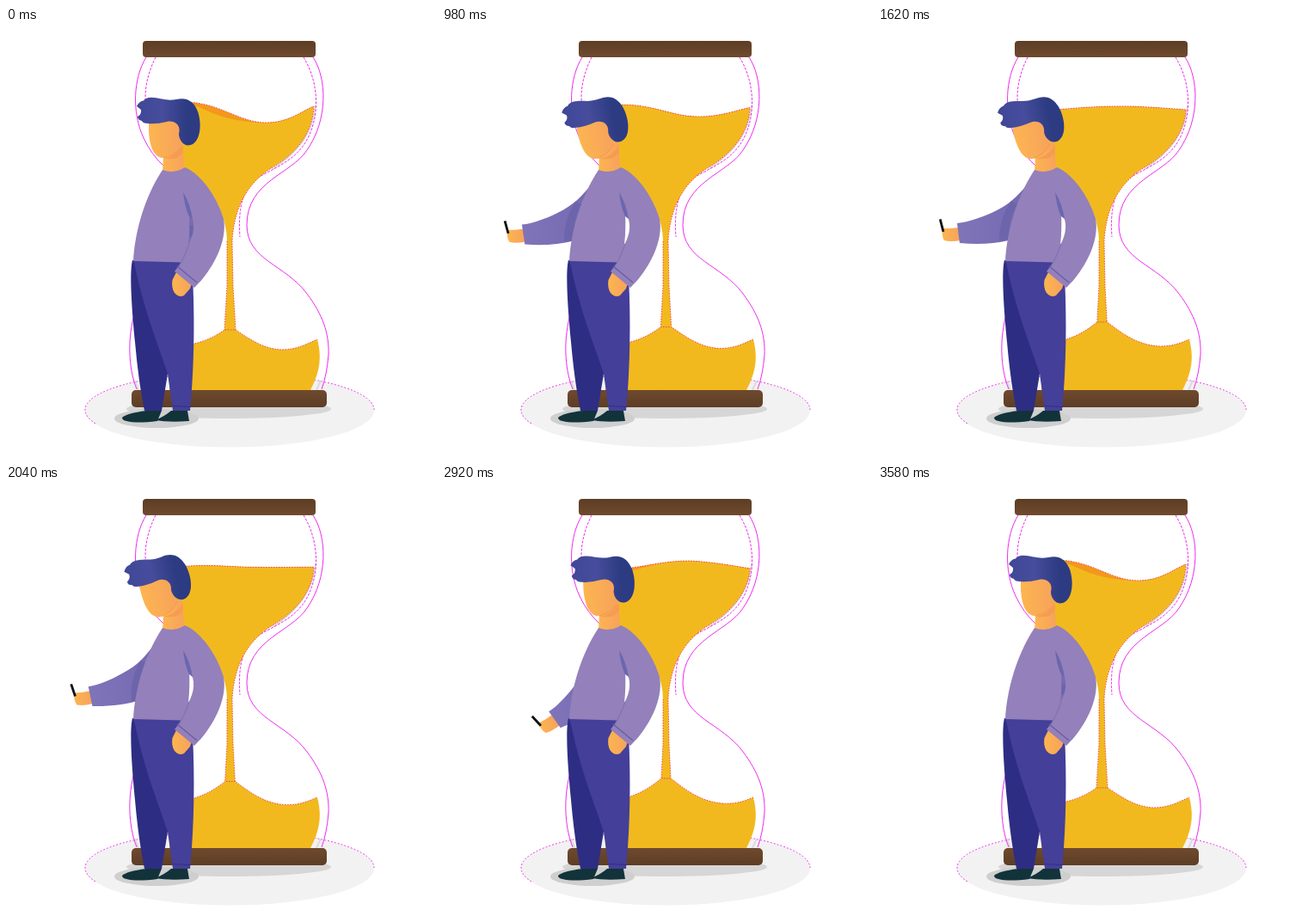
An HTML page that plays this animation: 500 by 500 pixels, repeating every 3600 ms.

```html
<!DOCTYPE html>
<html lang="en">
<head>
<meta charset="utf-8">
<title>Waiting by the hourglass</title>
<style>
  html, body { margin: 0; width: 100%; height: 100%; overflow: hidden; background: #fff; }
  svg { display: block; width: 500px; height: 500px; }
  .glass { fill: none; stroke: #ee2bee; stroke-width: 1; }
  .shine { fill: none; stroke: #dcdcdc; stroke-width: 2; }
  .sand { fill: #f2b91f; }
  .rim { fill: none; stroke: #f0384a; stroke-width: .9; stroke-dasharray: 1.5 1.5; }
</style>
</head>
<body>
<svg viewBox="0 0 500 500">
  <defs>
    <linearGradient id="wood" x2="0" y2="1">
      <stop stop-color="#5d3d25"/><stop offset="1" stop-color="#6f4a2e"/>
    </linearGradient>
    <linearGradient id="hair">
      <stop stop-color="#3f4796"/><stop offset=".4" stop-color="#474d9c"/><stop offset=".8" stop-color="#2c3b82"/>
    </linearGradient>
    <linearGradient id="skin">
      <stop stop-color="#fdb550"/><stop offset="1" stop-color="#f6a25c"/>
    </linearGradient>
    <linearGradient id="sleeve">
      <stop stop-color="#8074b9"/><stop offset="1" stop-color="#7469b0"/>
    </linearGradient>
  </defs>

  <!-- floor -->
  <ellipse cx="260" cy="444.500" rx="168" ry="43" fill="#f2f2f2"/>
  <path class="glass" stroke-dasharray="2 2" d="M104 460A168 43 0 1 1 428 444"/>
  <ellipse cx="259" cy="443" rx="119" ry="11" fill="#d6d6d6"/>
  <ellipse cx="175" cy="454" rx="49" ry="11" fill="#cfcfcf"/>

  <!-- hourglass -->
  <path class="shine" d="M360 90C357 122 340 144 310 164M366 410L361 421M150 410L154 421"/>
  <path class="glass" d="M357 34C373 58 375 106 350 142C332 170 280 178 280 229C280 270 325 275 350 309C368 333 376 355 375 380Q373 404 367 420"/>
  <path class="glass" d="M163 34C148 58 146 98 160 128Q169 147 183 160M150 330C141 360 142 395 152 420"/>
  <path class="glass" stroke-dasharray="3 1.500" d="M346 34C362 60 366 96 352 126C335 162 296 165 282 184Q269 204 272 243M174 34C161 60 159 85 166 105"/>
  <path id="back" fill="#f3981c"/>
  <path id="front" class="sand"/>
  <path id="mound" class="sand"/>
  <path id="rim" class="rim"/>
  <rect x="159" y="15" width="201" height="19" rx="4" fill="url(#wood)"/>
  <rect x="146" y="421" width="227" height="20" rx="5" fill="url(#wood)" transform="matrix(1 0 0 -1 0 862)"/>

  <!-- far arm -->
  <g id="arm">
    <path fill="url(#skin)" d="M95 232L84 233L76 233Q73 240 77 247Q84 249 96 247Z"/>
    <path stroke="#111" stroke-width="2.800" d="M72.300 222.500L76 237"/>
    <path fill="url(#sleeve)" d="M175 180C167 190 156 203 140 211C125 219 105 226 92 227L95 250C115 252 135 251 152 247L170 240Z"/>
    <path fill="#6d65ab" d="M155 201C147 213 140 230 141 248L153 246Q150 225 162 205Z"/>
  </g>

  <!-- legs -->
  <path fill="#12333a" d="M135 453Q140 448 163 445H181L176 457Q152 460 140 457Q135 456 135 453ZM173 456Q184 452 192 445H211L213 457Q190 459 173 456Z"/>
  <path fill="#2e2d84" d="M147 270C143 285 147 335 150 365Q154 411 161 445H181L188 402L200 380L190 271Z"/>
  <path fill="#443f98" d="M147 270L216 272C220 330 219 395 214 445H194L188 402C178 370 162 335 149 273Z"/>
  <path fill="none" stroke="#322f86" d="M194 439.500L215 440.500"/>

  <!-- torso and near arm -->
  <path fill="url(#skin)" d="M183 148L205 128L207 165Q196 171 182 168Z"/>
  <path fill="#f69c52" d="M184 152Q198 149 206 136V145Q200 154 184 152Z"/>
  <path fill="url(#skin)" d="M198 284L193.500 293Q192 302 196 308Q201 314 207 311L214 303L216 297Z"/>
  <path fill="#9480ba" fill-rule="evenodd" d="M182 165Q196 170 208 162C228 170 247 200 253 222C258 248 240 282 219 302L196 283L204 272.500L148 271C150 235 162 195 182 165ZM213 215C221 225 219 240 212 252Q214 235 213 215Z"/>
  <path fill="#6b66b0" d="M206 191Q208 209 213 219L217 222Q214 204 206 191Z"/>
  <path fill="none" stroke="#655da9" stroke-width="1.300" d="M199 277L222 296"/>
  <path fill="none" stroke="#7d6fb2" d="M213 251Q209 264 201 277"/>

  <g id="head">
    <path fill="url(#skin)" d="M166 106V120C167 137 171 149 181 151Q195 150 205 138L206 105Z"/>
    <path fill="none" stroke="#f39a50" d="M183 151Q197 148 205 138"/>
    <path fill="url(#hair)" d="M152 91Q155 85 160 84.500Q163 80 172 81C182 82 187 85 198 83C212 80 219 87 223 97C228 112 226 130 217 135C208 140 201 131 201 123C204 113 196 107 187 109Q175 112 165 111Q159 111 158 108Q153 107 153 103Q158 100 157 95Z"/>
  </g>
</svg>
<script>
const LOOP = 3600;
const el = id => document.getElementById(id);
const smooth = u => u * u * (3 - 2 * u);

// Interpolates every number of two paths that share one structure.
function mix(a, b, k) {
  const ends = b.match(/[\d.]+/g);
  let i = 0;
  return a.replace(/[\d.]+/g, n => (+n + (ends[i++] - n) * k).toFixed(2));
}

function track(keys, t) {
  const i = keys.findIndex(key => key[0] > t);
  const [t0, v0] = keys[i - 1], [t1, v1] = keys[i];
  return v0 + (v1 - v0) * smooth((t - t0) / (t1 - t0));
}

const armKeys = [[0, -62], [1100, 1], [1400, -4.6], [1700, 1], [2000, -4.6], [2300, 1], [LOOP, -62]];
const headKeys = [[0, 0], [1100, -10.7], [1600, -10.5], [2000, -12], [3240, 0], [LOOP, 0]];

const surface = {
  dip: 'M200 86C248 84 268 110 303 110C329 110 345 96 358 91',
  crest: 'M200 98C240 94 255 86 287 86C313 87 340 93 358 96'
};
const frontSurface = {
  dip: 'M200 86C225 85 240 110 303 110C329 110 345 96 358 91',
  crest: 'M200 107C235 96 255 86 287 86C313 87 340 93 358 96'
};
const heap = {
  dip: 'M190 372C225 368 240 361 254 351L267 351C285 363 300 373 320 374C340 374 352 366 362 362',
  crest: 'M190 368C225 362 240 352 255 339.5L266 339.5C280 350 300 368 330 369C345 369 352 366 362 362'
};
const wall = 'C357 118 342 143 310 162C280 180 265 210 263 248';

function draw(now) {
  const t = now % LOOP;
  const k = (1 - Math.cos(t / 600 * Math.PI)) / 2;
  const depth = Math.max(0, (Math.abs(2 * k - 1) - .6) / .4);
  const back = mix(surface.dip, surface.crest, k);
  const front = mix(back, mix(frontSurface.dip, frontSurface.crest, k), depth);
  const mound = mix(heap.dip, heap.crest, k);
  const peak = 351 - 11.5 * k;
  const funnel = `${wall}L264 300L${267 - k} ${peak + 1}H${254 + k}L257 300V248Q257 228 246 205L207 165L185 150Z`;

  el('back').setAttribute('d', back + 'L320 120L200 130Z');
  el('front').setAttribute('d', front + funnel);
  el('mound').setAttribute('d', mound + 'C368 385 364 402 354 421H190Z');
  el('rim').setAttribute('d', back + wall + `L264 300L${267 - k} ${peak}M257 248V300L${254 + k} ${peak}` + mound);
  el('arm').setAttribute('transform', `rotate(${track(armKeys, t)} 178 181)`);
  el('head').setAttribute('transform', `rotate(${track(headKeys, t)} 187 165)`);
}

const start = performance.now();
function tick() {
  draw(performance.now() - start);
  requestAnimationFrame(tick);
}
tick();
</script>
</body>
</html>
```
